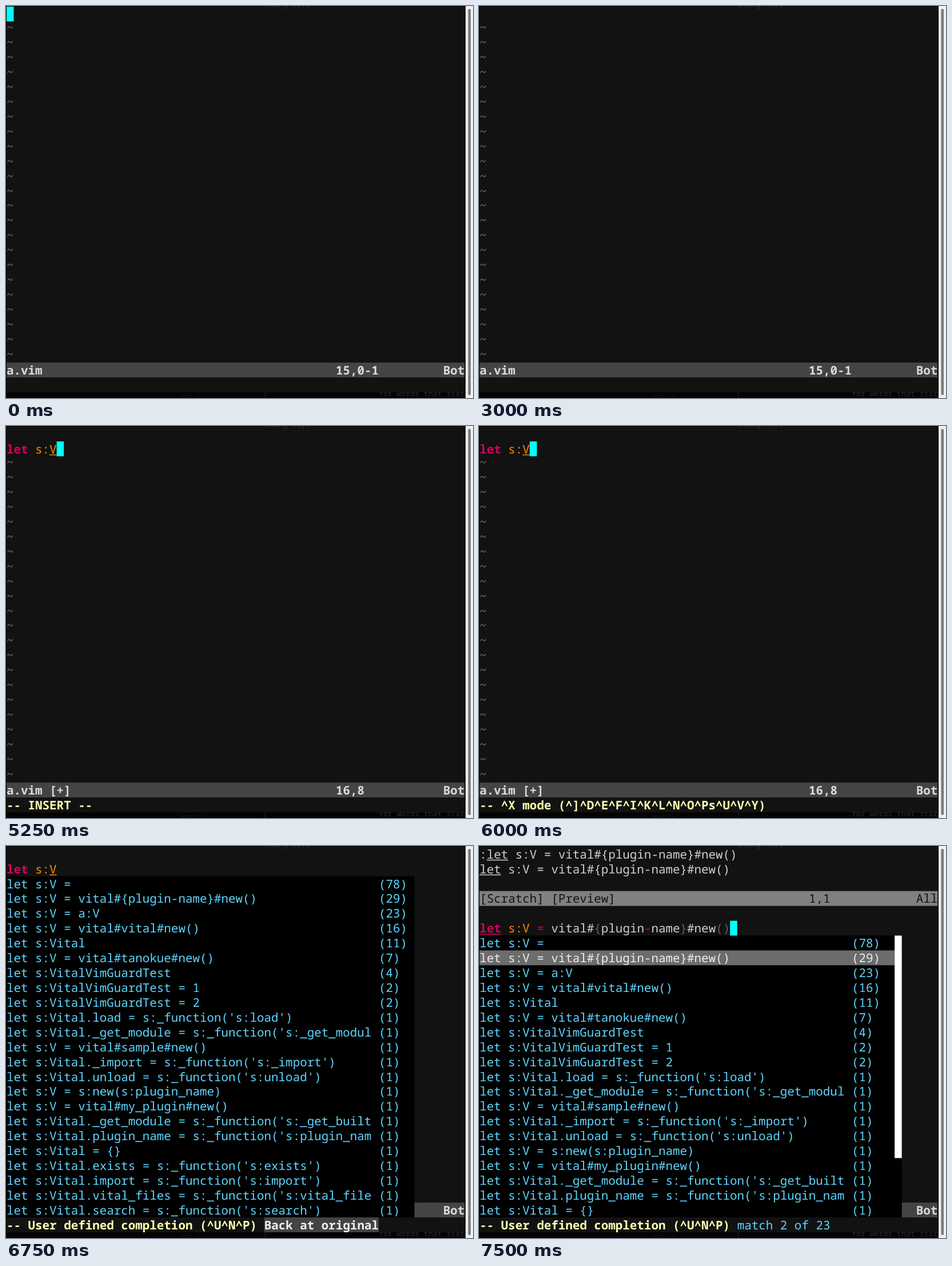
An HTML page that plays this animation: 817 px wide and 685 px high, repeating every 8 s.

```html
<!DOCTYPE html>
<html lang="en">
<head>
<meta charset="utf-8">
<title>Line completion</title>
<style>
  html, body { margin: 0; width: 100%; height: 100%; overflow: hidden; background: #000; }
  svg { display: block; width: 817px; height: 685px; }
  text {
    font: 20.867px "Noto Sans Mono", "DejaVu Sans Mono", monospace;
    white-space: pre; text-rendering: geometricPrecision; fill: #d0d0d0;
    font-variant-ligatures: none;
  }
  .bold, .key, .msg, .bar, .error { font-weight: bold; }
  .key, .op { fill: #d7005f; }
  .var { fill: #ff8700; }
  .dim { fill: #5f5f5f; }
  .tilde { fill: #707070; }
  .msg { fill: #ffffaf; }
  .bar { fill: #dadada; }
  .error { fill: #eeeeee; }
  .info, .item { fill: #5fd7ff; }
  .picked { fill: #eeeeee; }
  .preview { fill: #121212; }
  .ghost { font-size: 13.2px; fill: #2c2c2c; }
</style>
</head>
<body>
<svg viewBox="0 0 817 685">
  <rect width="817" height="685" fill="#030303"/>
  <text class="ghost" x="652" y="682">for words that star</text>
  <text class="ghost" x="304" y="688" opacity=".4">match</text>
  <rect x="453" y="675" width="1" height="10" fill="#2c2c2c"/>
  <rect x="1" y="1" width="802" height="674" fill="#121212"/>
  <text class="ghost" x="453" y="1.5">using keys</text>
  <rect x="804" width="13" height="685" fill="#f0f0f0"/>
  <rect x="808.5" y="5" width="4.5" height="675" rx="2.2" fill="#7a7a7a"/>
  <g id="screen"></g>
</svg>
<script>
const CELL_W = 12.52, CELL_H = 25.92, COLS = 64, LOOP = 8000;
const STATUS_ROW = 24, MESSAGE_ROW = 25;
const screen = document.getElementById('screen');

const candidates = `let s:V =|78
let s:V = vital#{plugin-name}#new()|29
let s:V = a:V|23
let s:V = vital#vital#new()|16
let s:Vital|11
let s:V = vital#tanokue#new()|7
let s:VitalVimGuardTest|4
let s:VitalVimGuardTest = 1|2
let s:VitalVimGuardTest = 2|2
let s:Vital.load = s:_function('s:load')|1
let s:Vital._get_module = s:_function('s:_get_modul|1
let s:V = vital#sample#new()|1
let s:Vital._import = s:_function('s:_import')|1
let s:Vital.unload = s:_function('s:unload')|1
let s:V = s:new(s:plugin_name)|1
let s:V = vital#my_plugin#new()|1
let s:Vital._get_module = s:_function('s:_get_built|1
let s:Vital.plugin_name = s:_function('s:plugin_nam|1
let s:Vital = {}|1
let s:Vital.exists = s:_function('s:exists')|1
let s:Vital.import = s:_function('s:import')|1
let s:Vital.vital_files = s:_function('s:vital_file|1
let s:Vital.search = s:_function('s:search')|1`.split('\n').map(s => s.split('|'));

const px = col => 1 + col * CELL_W;
const py = row => 1 + row * CELL_H;

function box(col, row, cols, rows, fill) {
  return `<rect x="${px(col)}" y="${py(row)}" width="${cols * CELL_W}" height="${rows * CELL_H}" fill="${fill}"/>`;
}

function put(col, row, str, cls = '') {
  const y = py(row) + (cls === 'tilde' ? 18.5 : 20.7);
  return `<text class="${cls}" x="${px(col)}" y="${y}">${str}</text>`;
}

function underline(col, row, cols, cls = '') {
  const fill = { key: '#d7005f', var: '#ff8700' }[cls] || '#d0d0d0';
  return `<rect x="${px(col)}" y="${py(row) + 22.8}" width="${cols * CELL_W}" height="1.5" fill="${fill}"/>`;
}

// A line is a list of [text, class, underlined].
function line(row, parts) {
  let col = 0, out = '';
  for (const [str, cls, under] of parts) {
    out += put(col, row, str, cls);
    if (under) out += underline(col, row, str.length, cls);
    col += str.length;
  }
  return out;
}

function statusBar(row, name, pos, place, fill, cls) {
  return box(0, row, COLS, 1, fill) + put(0, row, name, cls) +
    put(46, row, pos, cls) + put(61, row, place, cls);
}

function popup(top, picked) {
  const count = STATUS_ROW + 1 - top;
  const scrolls = count < candidates.length;
  const cols = scrolls ? 58 : 57;
  let out = box(0, top, cols + (scrolls ? 1 : 0), count, '#000');
  candidates.slice(0, count).forEach(([str, hits], i) => {
    const row = top + i, cls = i === picked ? 'picked' : 'item';
    if (i === picked) out += box(0, row, cols, 1, '#6c6c6c');
    out += put(0, row, str, cls) + put(52, row, `(${hits})`, cls);
  });
  if (scrolls) out += box(58, top, 1, 15, '#fff');
  return out;
}

function previewPane(lines, place) {
  return lines.map((s, row) => {
    const at = s.indexOf('let');
    return put(0, row, s) + underline(at, row, 3);
  }).join('') + statusBar(3, '[Scratch] [Preview]', '1,1', place, '#808080', 'preview');
}

const insert = [['-- INSERT --', 'msg']];
const ctrlX = [['-- ^X mode (^]^D^E^F^I^K^L^N^O^Ps^U^V^Y)', 'msg']];
const completing = ['-- User defined completion (^U^N^P) ', 'msg'];
const letKey = ['let', 'key'], letMarked = ['let', 'key', true];
const typedV = [letKey, [' '], ['s:', 'var'], ['V', 'var', true]];
const assign = [letMarked, [' '], ['s:V', 'var'], [' '], ['=', 'op']];
const fullCall = [...assign, [' vital#'], ['{', 'dim'], ['plugin'], ['-', 'op'],
  ['name'], ['}', 'dim'], ['#new'], ['()', 'dim']];

// Each step changes only the listed fields of the state before it.
const steps = [
  [0, { row: 0, parts: [], cursor: true, pos: '15,0-1', name: 'a.vim', message: [] }],
  [500, { cursor: false }],
  [1250, { cursor: true }],
  [1750, { cursor: false }],
  [2250, { cursor: true }],
  [3000, { cursor: false }],
  [3250, { row: 1, cursor: true, pos: '16,1', name: 'a.vim [+]', message: insert }],
  [3750, { parts: [['le', 'key', true]], pos: '16,3' }],
  [4000, { parts: [letMarked], pos: '16,4' }],
  [4250, { parts: [letKey, [' '], ['s', 'var', true]], pos: '16,6' }],
  [4750, { parts: [letKey, [' '], ['s', 'var'], [':']], pos: '16,7' }],
  [5250, { parts: typedV, pos: '16,8' }],
  [6000, { message: ctrlX }],
  [6250, { menu: true, picked: -1, message: [completing, ['Back at original', 'error']] }],
  [6750, { cursor: false }],
  [7250, {
    row: 5, parts: assign, cursor: true, picked: 0, place: 'Top',
    preview: [11, 14, 15].map(i => candidates[i][0]),
    message: [completing, ['match 1 of 23', 'info']]
  }],
  [7500, {
    parts: fullCall, picked: 1, place: 'All',
    preview: [':' + candidates[1][0], candidates[1][0]],
    message: [completing, ['match 2 of 23', 'info']]
  }]
];

function draw(s) {
  let out = '';
  for (let row = s.row + 1; row < STATUS_ROW; row++) out += put(0, row, '~', 'tilde');
  out += statusBar(STATUS_ROW, s.name, s.pos, 'Bot', '#444', 'bar');
  if (s.preview) out += previewPane(s.preview, s.place);
  out += line(s.row, s.parts);
  if (s.menu) out += popup(s.row + 1, s.picked);
  if (s.cursor) {
    const col = s.parts.reduce((n, part) => n + part[0].length, 0);
    out += box(col, s.row, 1, 1, '#0ff');
  }
  if (s.message.some(part => part[1] === 'error')) out += box(36, MESSAGE_ROW, 16, 1, '#444');
  screen.innerHTML = out + line(MESSAGE_ROW, s.message);
}

let shown = -1;
const start = performance.now();

function tick() {
  const t = (performance.now() - start) % LOOP;
  const count = steps.filter(([at]) => at <= t).length;
  if (count !== shown) {
    shown = count;
    draw(Object.assign({}, ...steps.slice(0, count).map(step => step[1])));
  }
  requestAnimationFrame(tick);
}
tick();
</script>
</body>
</html>
```
